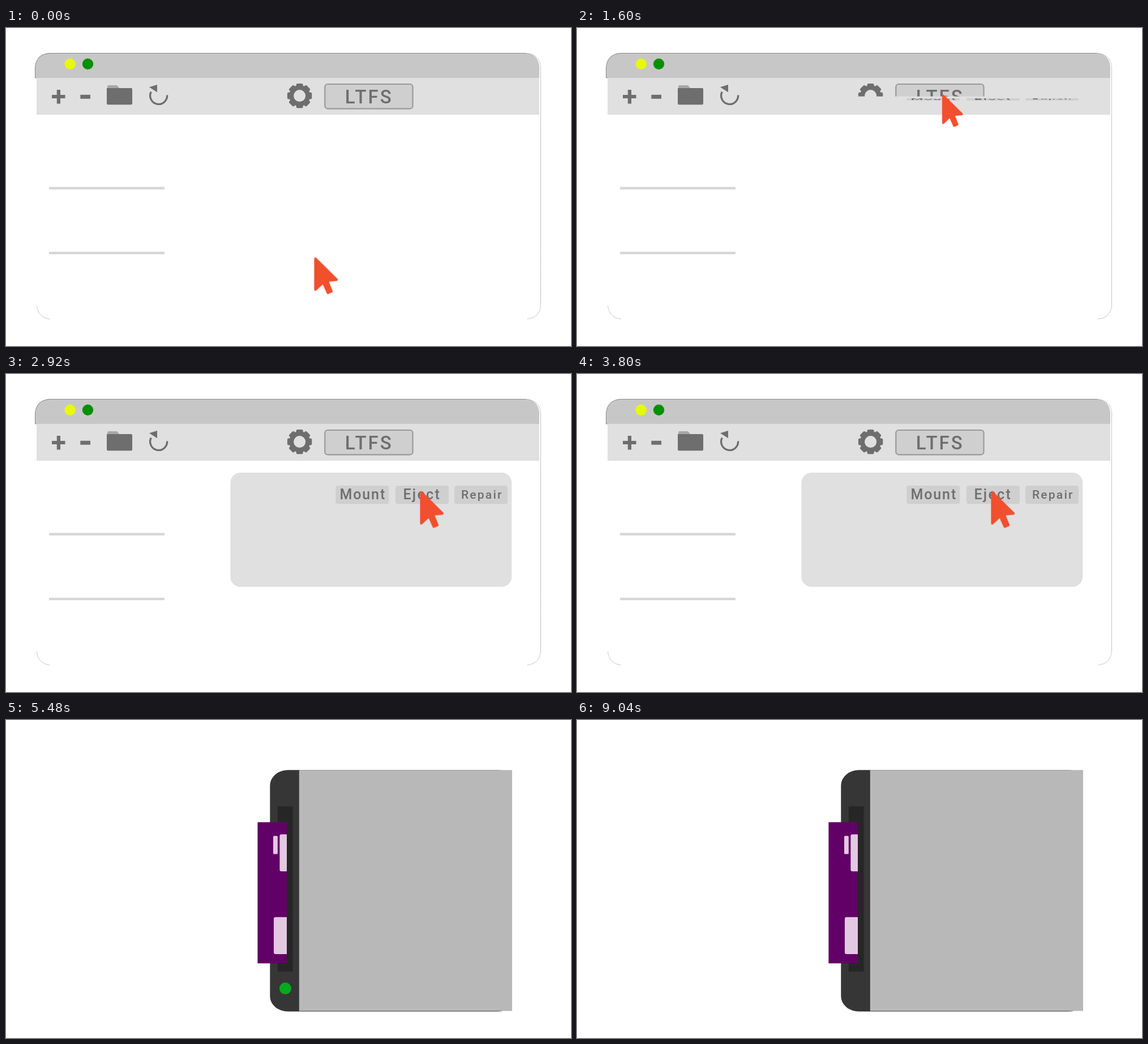
An HTML page that plays this animation: 998x561 px, repeating every 9080 ms.

```html
<!DOCTYPE html>
<html lang="en">
<head>
<meta charset="utf-8">
<title>Eject a tape</title>
<style>
  html, body { margin: 0; width: 100%; height: 100%; overflow: hidden; background: #fff; }
  svg { display: block; width: 100%; height: 100%; }
  text { font-family: Roboto, "Liberation Sans", sans-serif; font-weight: 500; fill: #6e6e6e; }
  .ink { fill: #6e6e6e; }
  .key { fill: #cfcfcf; }
  .app, .drive, .move, .press, .panel, .tape, .led { animation: 9080ms linear infinite; }

  .app { animation-name: app; animation-timing-function: step-end; }
  .drive { animation-name: drive; animation-timing-function: step-end; }
  .led { animation-name: led; animation-timing-function: step-end; }
  .move { animation-name: move; }
  .press { animation-name: press; transform-box: fill-box; transform-origin: center; }
  .panel { animation-name: panel; transform-origin: 0 113px; }
  .tape { animation-name: tape; }

  @keyframes app { 0% { visibility: visible } 43.16%, 100% { visibility: hidden } }
  @keyframes drive { 0% { visibility: hidden } 43.16%, 100% { visibility: visible } }

  /* tip of the pointer: rest, LTFS key, Eject key */
  @keyframes move {
    0%, 1.3% { transform: translate(544.3px, 404.7px); animation-timing-function: ease-in-out }
    14.5%, 18.94% { transform: translate(642.3px, 113.5px); animation-timing-function: cubic-bezier(.37, 0, .7, .5) }
    23.35% { transform: translate(694px, 164px); animation-timing-function: cubic-bezier(.3, .5, .63, 1) }
    27.4%, 100% { transform: translate(731.3px, 206.7px) }
  }
  @keyframes press {
    0%, 14.98% { transform: scale(1); animation-timing-function: ease-in-out }
    17.18% { transform: scale(.87); animation-timing-function: ease-in-out }
    19.38%, 37.8% { transform: scale(1); animation-timing-function: ease-in-out }
    39.6% { transform: scale(.87); animation-timing-function: ease-in-out }
    41.4%, 100% { transform: scale(1) }
  }
  @keyframes panel {
    0%, 16.3% { transform: scaleY(0); animation-timing-function: cubic-bezier(.37, 0, .63, 1) }
    22.03%, 100% { transform: scaleY(1) }
  }
  @keyframes tape {
    0%, 52.4% { transform: translateX(52px); animation-timing-function: ease-in-out }
    59.47%, 100% { transform: translateX(0) }
  }
  @keyframes led {
    0%, 51.97%, 62.98%, 74%, 84.95%, 96.03%, 100% { opacity: 0 }
    48.45%, 59.46%, 70.48%, 81.9%, 92.5% { opacity: 1 }
  }
</style>
</head>
<body>
<svg viewBox="0 0 998 561">
  <defs>
    <clipPath id="slot"><rect x="400" y="170" width="96" height="270"/></clipPath>
    <rect id="tooth" x="-6" y="-21.7" width="12" height="9" rx="2.5"/>
  </defs>

  <g class="app">
    <path d="M51.5 88V70Q53 46 77 44H918Q940 46 942 68V88Z" fill="#c7c7c7"/>
    <path d="M54 88H51.5V70Q53 46 77 44.5H918" fill="none" stroke="#8a8a8a"/>
    <path d="M918 44.5Q942 46 944.5 68V490Q942 511 920 513.5M54.5 490Q57 511 78 513.5" fill="none" stroke="#8a8a8a" stroke-dasharray="1 1"/>
    <rect x="54" y="88" width="888" height="65" fill="#e0e0e0"/>
    <circle cx="113.2" cy="63.5" r="9.7" fill="#e6fa00"/>
    <circle cx="144.5" cy="63.5" r="9.7" fill="#009000"/>

    <g class="ink">
      <path d="M81 118H89.8V109H96V118H104.5V124H96V133.5H89.8V124H81Z"/>
      <rect x="131.3" y="117.8" width="17.7" height="7"/>
      <path d="M179 107V103Q179 101 181 101H196L201 107Z" fill="#a8a8a8"/>
      <path d="M178 106H221Q223 106 223 108V133Q223 135.3 221 135.3H180Q178 135.3 178 133Z"/>
      <path d="M253 104.3L267 100V113.3Z"/>
      <path d="M256.3 112.5A15 15 0 1 0 284.6 118.3" fill="none" stroke="#6e6e6e" stroke-width="3.3"/>
    </g>

    <g transform="translate(518.6 119.6)" class="ink">
      <circle r="14.5" fill="none" stroke="#6e6e6e" stroke-width="8"/>
      <use href="#tooth"/>
      <use href="#tooth" transform="rotate(45)"/>
      <use href="#tooth" transform="rotate(90)"/>
      <use href="#tooth" transform="rotate(135)"/>
      <use href="#tooth" transform="rotate(180)"/>
      <use href="#tooth" transform="rotate(225)"/>
      <use href="#tooth" transform="rotate(270)"/>
      <use href="#tooth" transform="rotate(315)"/>
    </g>

    <rect x="563.3" y="99" width="155.2" height="43.3" rx="5" fill="#cfcfcf" stroke="#999" stroke-width="2.2"/>
    <text x="598.8" y="132.5" font-size="33" letter-spacing="3.1">LTFS</text>

    <rect x="76" y="280.4" width="204" height="4.4" fill="#d6d6d6"/>
    <rect x="76" y="394.7" width="204" height="4.4" fill="#d6d6d6"/>

    <g class="panel">
      <rect x="396.3" y="174" width="497" height="201.5" rx="18" fill="#e0e0e0"/>
      <rect class="key" x="582.3" y="197" width="94" height="32.3" rx="4"/>
      <rect class="key" x="688" y="197" width="94" height="32.3" rx="4"/>
      <rect class="key" x="792" y="197" width="94" height="32.3" rx="4"/>
      <text x="589.4" y="221" font-size="25" letter-spacing="1.9">Mount</text>
      <text x="701.4" y="221" font-size="25" letter-spacing="2.3">Eject</text>
      <text x="804" y="219.5" font-size="21" letter-spacing="2.2">Repair</text>
    </g>

    <g class="move">
      <path class="press" d="M2.3 2.3V56.7L16 43.8L24.4 62.5L30.6 59.8L23 40.8L39.7 39.2Z" fill="#f24f2e" stroke="#f24f2e" stroke-width="4.4" stroke-linejoin="round"/>
    </g>
  </g>

  <g class="drive">
    <rect x="466.3" y="88.3" width="434" height="426" rx="32" ry="27" fill="#363636"/>
    <rect x="894" y="80" width="10" height="440" fill="#fff"/>
    <rect x="517.8" y="88.3" width="376.2" height="425" fill="#b8b8b8"/>
    <rect x="479.8" y="152.3" width="26.8" height="291.4" fill="#262626"/>
    <g clip-path="url(#slot)">
      <g class="tape" fill="#e3c8e1">
        <rect x="444.4" y="180.3" width="200" height="249" fill="#610066"/>
        <rect x="472" y="204.5" width="7.8" height="32" rx="1.5"/>
        <rect x="483.4" y="201.8" width="60" height="65.3" rx="3"/>
        <rect x="473" y="347.8" width="60" height="65.3" rx="3"/>
      </g>
    </g>
    <circle class="led" cx="493.4" cy="473.6" r="10.5" fill="#00ab1e"/>
  </g>
</svg>
</body>
</html>
```
